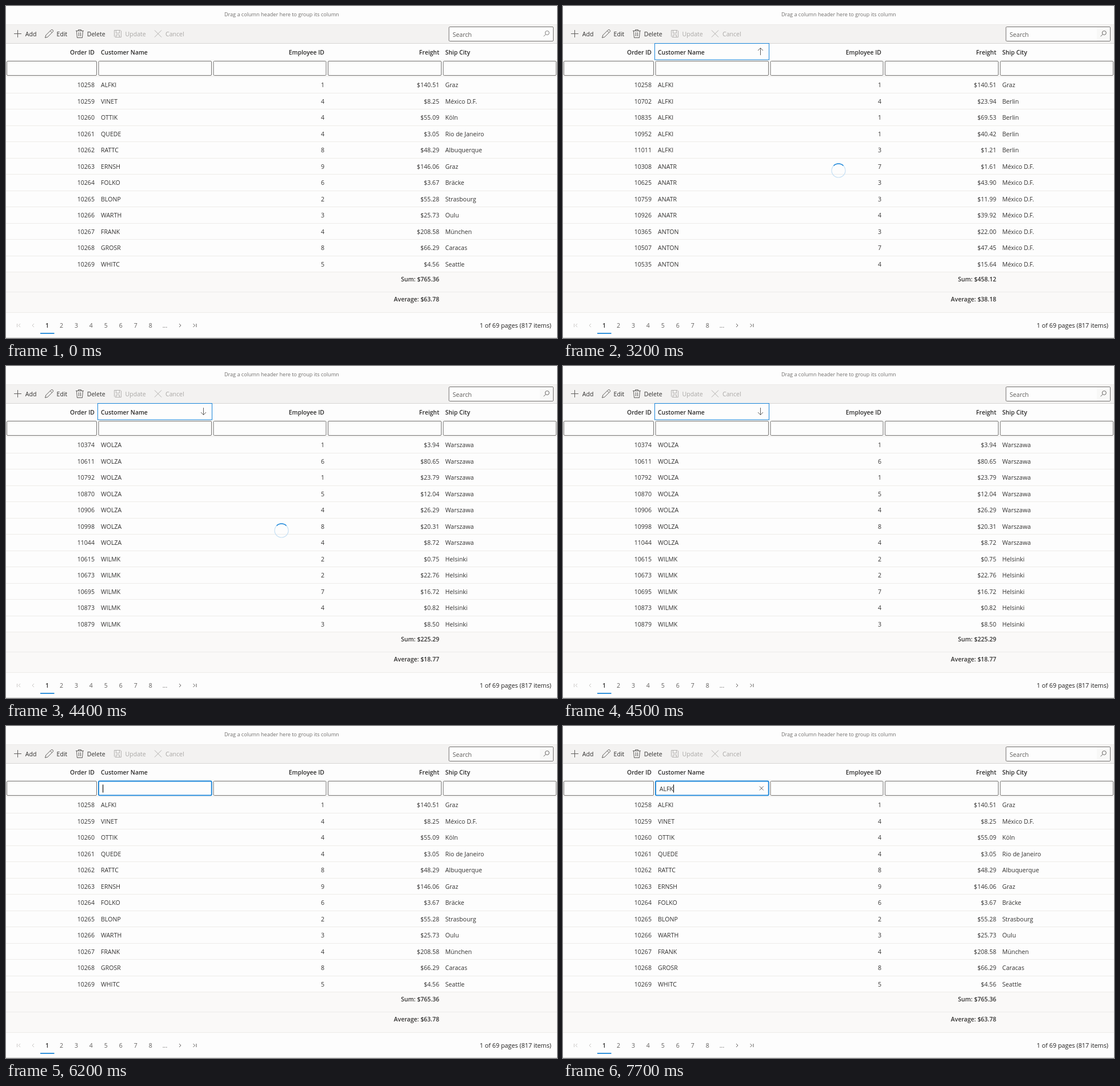
Recreate the animation shown at these times as an HTML page. Size 964 by 581 pixels, loop 8000 ms.

```html
<!DOCTYPE html>
<html lang="en">
<head>
<meta charset="utf-8">
<title>Sortable order grid</title>
<style>
  html, body { margin: 0; width: 100%; height: 100%; overflow: hidden; background: #fdfdfd; }
  svg { display: block; width: 964px; height: 581px; }
  text { font: 10.6px "Open Sans", "Noto Sans", sans-serif; fill: #323130; white-space: pre; }
  .hint { font-size: 9.1px; fill: #706e6c; }
  .head { font-size: 10.4px; font-weight: 600; fill: #2b2a29; }
  .total { font-size: 10.5px; font-weight: 600; }
  .info { font-size: 10.8px; font-weight: 500; fill: #201f1e; }
  .soft { fill: #605e5c; }
  .off { fill: #a9a7a5; }
  .line { fill: none; stroke: #605e5c; stroke-width: 1; }
  .pale { stroke: #b3b1af; }
  .faint { stroke: #c8c6c4; }
  .rule { fill: none; stroke: #edebe9; }
  .box { fill: #fdfdfd; stroke: #73716f; }
  .blue { fill: none; stroke: #1683d8; }
</style>
</head>
<body>
<svg id="stage" viewBox="0 0 964 581" xmlns="http://www.w3.org/2000/svg"></svg>
<script>
const LOOP = 8000, ROW_TOP = 138, ROW_STEP = 28.5;
const stage = document.getElementById('stage');

function add(tag, attrs, parent = stage) {
  const node = document.createElementNS('http://www.w3.org/2000/svg', tag);
  for (const key in attrs) node.setAttribute(key, attrs[key]);
  parent.appendChild(node);
  return node;
}
const rect = (x, y, width, height, attrs, parent) => add('rect', { x, y, width, height, ...attrs }, parent);
const path = (d, cls = 'line', parent) => add('path', { d, class: cls }, parent);
const show = (node, on) => node.setAttribute('visibility', on ? 'visible' : 'hidden');

function label(str, x, y, cls = '', anchor = 'start', parent = stage) {
  const node = add('text', { x, y, class: cls, 'text-anchor': anchor }, parent);
  node.textContent = str;
  return node;
}

const columns = [
  { x: 155, anchor: 'end', title: 'Order ID' },
  { x: 166, anchor: 'start', title: 'Customer Name' },
  { x: 557, anchor: 'end', title: 'Employee ID' },
  { x: 758, anchor: 'end', title: 'Freight' },
  { x: 768.5, anchor: 'start', title: 'Ship City' }
];

// Each row: order, customer, employee, freight, city
const pages = {
  plain: {
    sum: '$765.36', average: '$63.78',
    rows: `10258|ALFKI|1|140.51|Graz
10259|VINET|4|8.25|México D.F.
10260|OTTIK|4|55.09|Köln
10261|QUEDE|4|3.05|Rio de Janeiro
10262|RATTC|8|48.29|Albuquerque
10263|ERNSH|9|146.06|Graz
10264|FOLKO|6|3.67|Bräcke
10265|BLONP|2|55.28|Strasbourg
10266|WARTH|3|25.73|Oulu
10267|FRANK|4|208.58|München
10268|GROSR|8|66.29|Caracas
10269|WHITC|5|4.56|Seattle`
  },
  ascending: {
    sum: '$458.12', average: '$38.18',
    rows: `10258|ALFKI|1|140.51|Graz
10702|ALFKI|4|23.94|Berlin
10835|ALFKI|1|69.53|Berlin
10952|ALFKI|1|40.42|Berlin
11011|ALFKI|3|1.21|Berlin
10308|ANATR|7|1.61|México D.F.
10625|ANATR|3|43.90|México D.F.
10759|ANATR|3|11.99|México D.F.
10926|ANATR|4|39.92|México D.F.
10365|ANTON|3|22.00|México D.F.
10507|ANTON|7|47.45|México D.F.
10535|ANTON|4|15.64|México D.F.`
  },
  descending: {
    sum: '$225.29', average: '$18.77',
    rows: `10374|WOLZA|1|3.94|Warszawa
10611|WOLZA|6|80.65|Warszawa
10792|WOLZA|1|23.79|Warszawa
10870|WOLZA|5|12.04|Warszawa
10906|WOLZA|4|26.29|Warszawa
10998|WOLZA|8|20.31|Warszawa
11044|WOLZA|4|8.72|Warszawa
10615|WILMK|2|0.75|Helsinki
10673|WILMK|2|22.76|Helsinki
10695|WILMK|7|16.72|Helsinki
10873|WILMK|4|0.82|Helsinki
10879|WILMK|3|8.50|Helsinki`
  }
};

function drawToolbar() {
  label('Drag a column header here to group its column', 482.3, 18.3, 'hint', 'middle');
  rect(0, 33, 964, 32, { fill: '#f3f2f1' });
  path('M0 32.5H964', 'rule');
  path('M0 65.5H964', 'rule').style.stroke = '#d8d6d4';

  path('M14 48.5H27M20.5 42V55');
  path('M68.5 55.5L69.8 51L79 41.8Q80.5 40.8 82 42.2Q83.3 43.8 82 45.2L72.8 54.3ZM77.3 43.5L80.4 46.7');
  path('M122 43.5H136M126.5 43.5V41.5H131.5V43.5M123.5 43.5L124.5 55.5H133.5L134.5 43.5M127.5 46V53M130.5 46V53');
  path('M189.5 42.5H200L201.5 44V54.5H191L189.5 53ZM192.5 42.5V47.5H198.5V42.5M192.5 54.5V50.5H198.5V54.5', 'line pale');
  path('M260 42.5L272 54.5M272 42.5L260 54.5', 'line pale');
  label('Add', 33.7, 53.3);
  label('Edit', 88.5, 53.3);
  label('Delete', 141.7, 53.3);
  label('Update', 208.5, 53.3, 'off');
  label('Cancel', 279, 53.3, 'off');

  rect(775, 36.5, 182.5, 25, { class: 'box', rx: 1.5 });
  label('Search', 781.5, 53.8, 'soft');
}

function drawGrid() {
  path('M0 94.5H964', 'rule').style.stroke = '#f4f3f2';
  for (const c of columns) label(c.title, c.x, 84.7, 'head', c.anchor);
  [[1.5, 157], [162, 197.5], [363, 197], [563.5, 198], [765, 197.5]]
    .forEach(([x, w]) => rect(x, 96.5, w, 25, { class: 'box', rx: 1.5 }));

  rect(0, 465, 964, 71, { fill: '#faf9f8' });
  path('M0 123.5H964', 'rule');
  for (let i = 0; i < 12; i++) path(`M0 ${Math.floor(152 + i * ROW_STEP) + .5}H964`, 'rule');
  path('M0 500.5H964M0 536.5H964', 'rule');
}

function drawPage(page) {
  const group = add('g', {});
  page.rows.split('\n').forEach((row, i) => {
    row.split('|').forEach((value, c) => {
      const { x, anchor } = columns[c];
      label(c === 3 ? '$' + value : value, x, ROW_TOP + 4.2 + i * ROW_STEP, '', anchor, group);
    });
  });
  label('Sum: ' + page.sum, 758, 481.5, 'total', 'end', group);
  label('Average: ' + page.average, 758, 517.3, 'total', 'end', group);
  return group;
}

function drawPager() {
  path('M19.5 556V562M25 556L22 559L25 562', 'line faint');
  path('M49 556L46 559L49 562', 'line faint');
  label('1', 72, 563, 'total', 'middle');
  rect(60, 572, 24.5, 1.6, { fill: '#0078d4' });
  for (let n = 2; n <= 8; n++) label(n, 97 + (n - 2) * 25.95, 563, 'soft', 'middle');
  label('...', 278, 563, 'soft', 'middle');
  path('M303 556L306 559L303 562');
  path('M327.5 556L330.5 559L327.5 562M333 556V562');
  label('1 of 69 pages (817 items)', 954, 563, 'info', 'end');
  path('M0 580.5H964', 'rule').style.stroke = '#d6d5d4';
}

drawToolbar();
drawGrid();
drawPager();
const groups = {};
for (const name in pages) groups[name] = drawPage(pages[name]);

const lensBack = rect(934, 37.5, 23, 23, { fill: '#f8f8f7' });
const lens = add('g', {});
add('circle', { cx: 946.8, cy: 47, r: 3.5, class: 'line' }, lens);
path('M944.3 49.5L940.5 53.3', 'line', lens);

const headRing = rect(160.5, 65.5, 200, 28.5, { class: 'blue' });
const arrowUp = path('M345.5 86V73.5M341 78L345.5 73.5L350 78');
const arrowDown = path('M345.5 73V85.5M341 81L345.5 85.5L350 81');

const filter = add('g', {});
rect(162, 96.5, 197.7, 24.9, { class: 'blue', 'stroke-width': 1.8, rx: 1.5 }, filter);
const typed = label('', 168.7, 113.7, '', 'start', filter);
const caret = rect(169, 102.5, 1.2, 14, { fill: '#111' }, filter);
const clear = path('M343.8 105.5L350.8 112.5M350.8 105.5L343.8 112.5');

const spinner = add('g', {});
add('circle', { cx: 482, cy: 288, r: 12, fill: 'none', stroke: '#c7e0f4', 'stroke-width': 1.2 }, spinner);
path('M473.5 279.5A12 12 0 0 1 490.5 279.5', 'blue', spinner).setAttribute('stroke-width', 1.4);

const keyTimes = [6700, 7300, 7500, 7700];
const between = (t, a, b) => t >= a && t < b;

function render(t) {
  const up = between(t, 3200, 4400), down = between(t, 4400, 5100);
  show(groups.plain, !up && !down);
  show(groups.ascending, up);
  show(groups.descending, down);
  show(arrowUp, up);
  show(arrowDown, down);
  show(headRing, between(t, 3200, 6200));
  show(spinner, between(t, 3200, 3300) || between(t, 4400, 4500));

  const hover = t < 300 ? 0 : t < 400 ? .5 : 1;
  lensBack.setAttribute('opacity', hover);
  lens.setAttribute('opacity', .8 + .15 * hover);

  show(filter, t >= 6200);
  show(clear, t >= 6800);
  const text = 'ALFK'.slice(0, keyTimes.filter(k => t >= k).length);
  if (typed.textContent !== text) typed.textContent = text;
  caret.setAttribute('x', text ? 168.7 + typed.getComputedTextLength() : 169);
}

const start = performance.now();
function tick() {
  render((performance.now() - start) % LOOP);
  requestAnimationFrame(tick);
}
tick();
</script>
</body>
</html>
```
